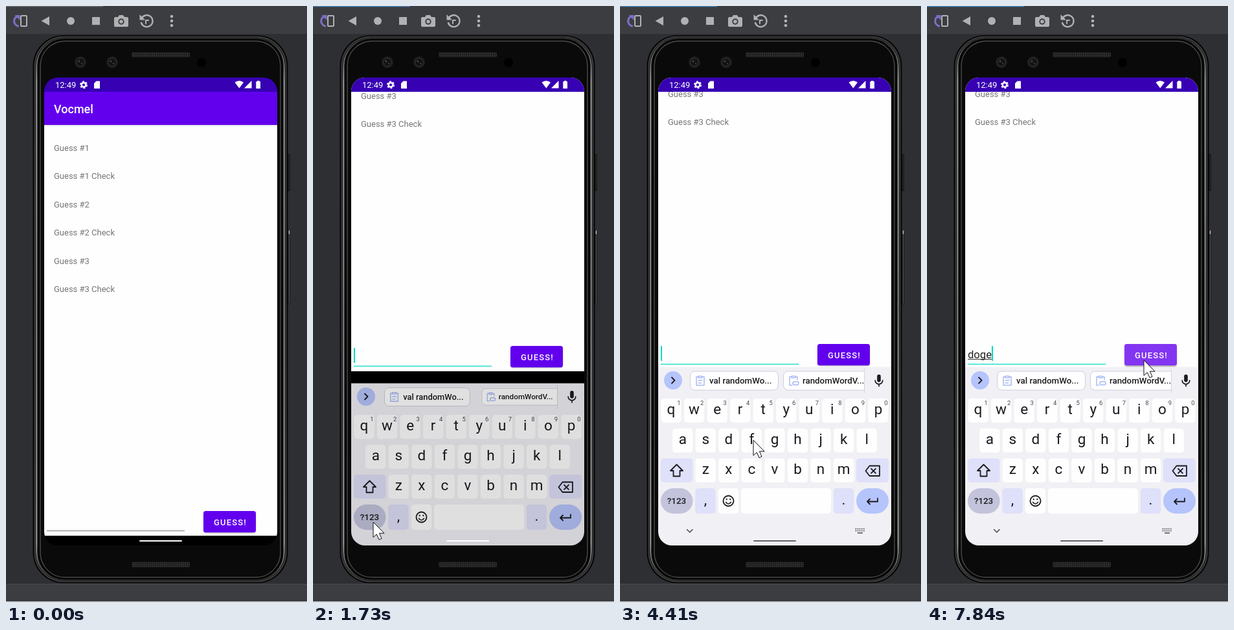
An HTML page for the animation above (8 s loop, 465x917 px).

```html
<!DOCTYPE html>
<html lang="en">
<head>
<meta charset="utf-8">
<title>Word game on a phone</title>
<style>
  html, body { margin: 0; width: 465px; height: 917px; overflow: hidden; background: #2e2f33; }
  svg { display: block; font-family: Roboto, sans-serif; }
  .label { font-size: 13px; fill: #757575; }
  .key { font-size: 22.5px; fill: #1b1b1f; text-anchor: middle; }
  .hint { font-size: 9.5px; fill: #44464f; text-anchor: middle; }
  .chip { font-size: 13.3px; font-weight: 500; fill: #1b1b1f; }
  .line { fill: none; stroke-linecap: round; stroke-linejoin: round; }
</style>
</head>
<body>
<svg width="465" height="917" viewBox="0 0 465 917">
  <defs>
    <clipPath id="screen"><rect x="59" y="110" width="360" height="720" rx="21"/></clipPath>
    <clipPath id="btnClip"><rect x="305" y="777" width="81" height="33" rx="3.5"/></clipPath>
    <clipPath id="chipClip"><rect x="95" y="556" width="282.5" height="42"/></clipPath>
    <pattern id="mesh" width="3" height="3" patternUnits="userSpaceOnUse">
      <rect width="3" height="3" fill="#161616"/><circle cx="1.5" cy="1.5" r="1" fill="#434343"/>
    </pattern>
    <linearGradient id="fade" x2="0" y2="1">
      <stop offset="0" stop-opacity=".12"/><stop offset="1" stop-opacity="0"/>
    </linearGradient>
    <linearGradient id="rim" x2="0" y2="1">
      <stop offset="0" stop-color="#2c2c2c"/><stop offset=".08" stop-color="#a0a0a0"/>
      <stop offset=".5" stop-color="#8a8a8a"/><stop offset=".93" stop-color="#a0a0a0"/>
      <stop offset="1" stop-color="#2c2c2c"/>
    </linearGradient>
    <filter id="blur" x="-20%" y="-40%" width="140%" height="180%"><feGaussianBlur stdDeviation="1.2"/></filter>
  </defs>

  <!-- emulator window -->
  <rect width="465" height="917" fill="#2e2f33"/>
  <rect width="465" height="43" fill="#3c3d41"/>
  <rect y="890" width="465" height="27" fill="#3c3d41"/>
  <path d="M0 889.5H465" stroke="#4b4c50"/>
  <path d="M0 916.5H465" stroke="#c4c4c6"/>
  <rect id="tab" width="150" height="1.2"/>
  <g fill="#afb1b3">
    <path class="line" d="M18.5 31Q11 28 13 20.5Q14 17.5 16 17" stroke="#7b70c6" stroke-width="3"/>
    <path d="M13.5 14H21.5V22Z" fill="#7b70c6"/>
    <rect x="23" y="15" width="9" height="16" rx="1" fill="none" stroke="#afb1b3" stroke-width="2"/>
    <path d="M54.5 23L67 16V30Z"/>
    <circle cx="100" cy="23" r="6"/>
    <rect x="133" y="17" width="12" height="12"/>
    <path d="M169 17H173L175 14H181L183 17H187Q189 17 189 19V30Q189 32 187 32H169Q167 32 167 30V19Q167 17 169 17Z"/>
    <circle cx="178" cy="24" r="4.7" fill="#3c3d41"/><circle cx="178" cy="24" r="2.8"/>
    <path class="line" d="M209.5 19A9 9 0 1 1 209 26" stroke="#afb1b3" stroke-width="2.4"/>
    <path d="M206.5 13V21.5H215Z"/>
    <path class="line" d="M216 27V22H220" stroke="#afb1b3" stroke-width="2"/>
    <circle cx="256" cy="16" r="2.3"/><circle cx="256" cy="23" r="2.3"/><circle cx="256" cy="30" r="2.3"/>
  </g>

  <!-- phone body -->
  <rect x="435" y="228" width="4" height="57" rx="1.5" fill="#17181a"/>
  <rect x="435" y="345" width="4" height="114" rx="1.5" fill="#17181a"/>
  <path d="M437.5 346V458" stroke="#5c5c5c"/>
  <path d="M437.5 345.5V351" stroke="#c8c8c8" stroke-width="1.5"/>
  <path d="M437.5 230V283" stroke="#2b2c2e"/>
  <rect x="41.5" y="45" width="394" height="843" rx="47" fill="#050505"/>
  <rect x="44.5" y="47.5" width="388" height="838" rx="45" fill="none" stroke="#3d3d3d" stroke-width="2"/>
  <rect x="47.3" y="49.5" width="382.4" height="834" rx="43" fill="#060606" stroke="url(#rim)" stroke-width="2"/>
  <rect x="53" y="54" width="371" height="825" rx="38" fill="#0a0a0a" stroke="#4a4a4a" stroke-width="1.4"/>
  <rect x="194" y="71" width="90" height="8" rx="2" fill="url(#mesh)"/>
  <rect x="194" y="855.5" width="90" height="8" rx="2" fill="url(#mesh)"/>
  <g id="lenses"></g>
  <circle cx="302" cy="87" r="7" fill="#000"/>

  <g clip-path="url(#screen)">
    <rect x="59" y="110" width="360" height="720"/>
    <g id="app">
      <rect x="59" y="132" width="360" height="684" fill="#fefefe"/>
      <rect x="59" y="183" width="360" height="3" fill="url(#fade)"/>
      <rect x="59" y="132" width="360" height="51" fill="#6200ee"/>
      <text x="74" y="165" font-size="18" font-weight="500" fill="#fff">Vocmel</text>
      <g id="labels"></g>
      <path id="field"/>
      <path id="under" stroke="#333"/>
      <text id="typed" x="63" y="799" font-size="16.6" fill="#212121"></text>
      <rect id="caret" y="780" width="2" height="23" fill="#03dac5"/>
      <rect id="shadow" x="305.5" y="779" width="80" height="32" rx="4" opacity=".3" filter="url(#blur)"/>
      <rect x="305" y="777" width="81" height="33" rx="3.5" fill="#6200ee"/>
      <g clip-path="url(#btnClip)" fill="#fff">
        <rect id="tint" x="305" y="777" width="81" height="33"/>
        <circle id="ripple" cx="336" cy="802" fill-opacity=".12"/>
      </g>
      <text x="321" y="798.5" font-size="13" font-weight="500" letter-spacing="1.15" fill="#fff">GUESS!</text>
    </g>
    <rect x="59" y="815" width="360" height="15"/>

    <g id="kb">
      <rect x="59" y="555.5" width="360" height="275" fill="#f1f0f5"/>
      <circle cx="82" cy="576" r="14" fill="#b5c4fb"/>
      <path class="line" d="M80 571.5L84.5 576L80 580.5" stroke="#1b1b1f" stroke-width="1.8"/>
      <g clip-path="url(#chipClip)"><g id="chip1"></g><g id="chip2"></g></g>
      <path d="M377.5 558V595" stroke="#d3d3da"/>
      <rect x="397.2" y="567" width="5.6" height="11.5" rx="2.8" fill="#1b1b1f"/>
      <path class="line" d="M394.2 576A5.8 5.8 0 0 0 405.8 576M400 582V585" stroke="#1b1b1f" stroke-width="1.7"/>
      <g id="keys"></g>
      <g class="line" stroke="#1b1b1f" stroke-width="1.8">
        <path d="M87.5 705.5L97 715H92.5V723.5H82.5V715H78Z"/>
        <path d="M385.5 707.5H401V723H385.5L379.5 715.2ZM388 711.8L395 718.8M395 711.8L388 718.8"/>
        <circle cx="167.5" cy="761.5" r="8"/>
        <path d="M163.6 763.5Q167.5 768.5 171.4 763.5" stroke-width="1.7"/>
        <path d="M164.7 759V759.1M170.3 759V759.1" stroke-width="2.3"/>
        <path d="M398 757.5V762.5H382M386 758.5L382 762.5L386 766.5"/>
      </g>
      <g id="nav" stroke="#4a4a4e" fill="none">
        <path class="line" d="M103.5 805.5L107.8 809.8L112 805.5" stroke-width="1.5"/>
        <path d="M363.5 804.5H378M363.5 807.5H378" stroke-width="1.6" stroke-dasharray="1.8 1.3"/>
        <path d="M367 810.8H375" stroke-width="1.4"/>
      </g>
    </g>

    <rect x="59" y="110" width="360" height="22" fill="#3700b3"/>
    <g fill="#fff">
      <text x="76" y="126" font-size="13">12:49</text>
      <circle cx="120" cy="121.3" r="3.3" fill="none" stroke="#fff" stroke-width="2.4"/>
      <circle cx="120" cy="121.3" r="5" fill="none" stroke="#fff" stroke-width="2" stroke-dasharray="2.8 2.436"/>
      <path d="M139.5 115.5H145V127H136V119Z"/>
      <path d="M353.5 117.5Q360.3 112.5 367 117.5L360.3 126.5Z"/>
      <path d="M379.5 115V126.5H368Z"/>
      <path d="M388 115H391.5V116.2H393V127H386.3V116.2H388Z"/>
    </g>
    <rect id="handle" x="206" y="822" width="66" height="2" rx="1"/>
  </g>

  <path id="cursor" d="M0 0V23.5L5.3 18.8L9 27L13 25.2L9.4 17.2H17Z" fill="#fff" stroke="#111" stroke-linejoin="round"/>
</svg>
<script>
const LOOP = 8000, CYAN = '#03dac5';
const $ = id => document.getElementById(id);
const set = (id, attrs) => { for (const k in attrs) $(id).setAttribute(k, attrs[k]); };
const rect = (x, y, w, h, r, fill, extra = '') =>
  `<rect x="${x}" y="${y}" width="${w}" height="${h}" rx="${r}" fill="${fill}" ${extra}/>`;
const text = (cls, x, y, s) => `<text class="${cls}" x="${x}" y="${y}">${s}</text>`;

function buildStage() {
  $('lenses').innerHTML = [115, 164].map(x =>
    `<circle cx="${x}" cy="86.5" r="9" fill="#1e1e1e"/><circle cx="${x}" cy="86.5" r="6" fill="#111" stroke="#333"/>
     <circle cx="${x - 2}" cy="85" r="1.5" fill="#484848"/><circle cx="${x + 2}" cy="88.5" r="1.2" fill="#3c3c3c"/>`).join('');

  $('labels').innerHTML = Array.from({ length: 6 }, (_, i) =>
    text('label', 74, 223 + i * 43.4, `Guess #${(i >> 1) + 1}${i % 2 ? ' Check' : ''}`)).join('');

  const chip = (x, w, s, link) => rect(x, 562, w, 29, 7, '#fff', 'stroke="#cdcddc"') +
    `<g class="line" stroke="#a9b9f5" stroke-width="1.5"><path d="M${x + 12.5} 570.5H${x + 9.5}V583.5H${x + (link ? 13 : 21.5)}M${x + 18.5} 570.5H${x + 21.5}V${link ? 575 : 583.5}M${x + 12.5} 569.5H${x + 18.5}V572H${x + 12.5}Z"/>` +
    (link ? `<rect x="${x + 14.5}" y="578" width="9" height="5" rx="2.5"/>`
          : `<path d="M${x + 12.5} 576H${x + 18.5}M${x + 12.5} 580H${x + 17}"/>`) +
    '</g>' + text('chip', x + 29.5, 580.7, s);
  $('chip1').innerHTML = chip(108.5, 136, 'val randomWo...', false);
  $('chip2').innerHTML = chip(252.5, 140, 'randomWordV...', true);

  const row = (letters, x0, y, hints) => [...letters].map((c, i) => {
    const x = x0 + i * 35.55;
    return rect(x - 15.7, y, 31.4, 37, 5, '#fefefe') + text('key', x, y + 24, c) +
      (hints ? text('hint', x + 12, y + 10, (i + 1) % 10) : '');
  }).join('');
  const soft = '#dfe0f9';
  $('keys').innerHTML = row('qwertyuiop', 79, 604, true) + row('asdfghjkl', 96.8, 650) + row('zxcvbnm', 132.3, 696) +
    rect(63, 696, 49.5, 37, 5, soft) + rect(365, 696, 50, 37, 5, soft) +
    rect(63, 742, 49.5, 39, 19.5, '#c3c3dc') + rect(116.2, 742, 31.6, 39, 5, soft) +
    rect(151.8, 742, 31.4, 39, 5, '#fefefe') + rect(187, 742, 139, 39, 5, '#fefefe') +
    rect(329.8, 742, 31.4, 39, 5, soft) + rect(365, 742, 50, 39, 19.5, '#b5c4fb') +
    `<g font-size="13.5" font-weight="500" fill="#1b1b1f" text-anchor="middle"><text x="87.5" y="766">?123</text></g>` +
    text('key', 132, 767, ',') + text('key', 345.5, 767, '.');
}

// hard steps: [time, ...values]
const PAN = [[0, 0], [1530, 130], [1600, 226], [1660, 247], [1730, 254], [1800, 257]];
// keyboard offset, opacity, chip scales
const KEYBOARD = [[0, 280, 0, 0, 0], [1600, 155, .32, .69, .15], [1660, 70, .65, .88, .6],
  [1730, 25, .88, .97, .88], [1800, 6, 1, 1, 1], [1870, 0, 1, 1, 1]];
// line colour, weight, height
const FIELD = [[0, '#777', 1, 807.5], [1260, CYAN, 2, 808], [1530, CYAN, 1.3, 808.2]];
// navigation icon opacity, handle colour
const NAV = [[0, 0, '#fff'], [2010, .3, '#cfcfd2'], [2150, .5, '#cfcfd2'], [2360, .5, '#b2b2b5'],
  [2430, .5, '#a0a0a3'], [3410, .75, '#808083'], [3480, 1, '#636366']];
// letters typed, letters underlined
const TYPED = [[0, 0, 0], [5860, 1, 1], [6060, 2, 2], [6130, 3, 3], [6260, 4, 3], [6480, 4, 4]];
const BLINK = [1330, 1870, 2360, 2860, 3410, 3880, 4410, 4870, 5400, 6880, 7490];

const easeOut = p => 1 - (1 - p) ** 2;
const easeInOut = p => p * p * (3 - 2 * p);
// start, end, steps, easing, from, bend, to
const MOVES = [
  [510, 1260, 12, easeOut, [285, 868], [170, 776], [93, 794]],
  [2570, 3140, 9, easeOut, [93, 794], [159, 756], [206, 668]],
  [6880, 7290, 7, easeInOut, [206, 668], [270, 600], [335, 545]],
];

const at = (table, t) => table.filter(r => r[0] <= t).pop().slice(1);

function stepped(t, start, end, n) {
  if (t < start) return 0;
  return Math.min(n, Math.floor((t - start) * (n - 1) / (end - start) + .01) + 1) / n;
}

function cursorAt(t) {
  const move = MOVES.filter(m => m[0] <= t).pop();
  if (!move) return null;
  const [start, end, n, ease, a, b, c] = move;
  const u = ease(stepped(t, start, end, n)), v = 1 - u;
  return a.map((_, i) => v * v * a[i] + 2 * u * v * b[i] + u * u * c[i]);
}

function render(t) {
  set('tab', { fill: t < 1330 ? '#6f7073' : '#4a88c7' });

  const [pan] = at(PAN, t);
  set('app', { transform: `translate(0 ${-pan})` });
  const [color, weight, y] = at(FIELD, t);
  set('field', { d: `M63 ${y}H276`, stroke: color, 'stroke-width': weight });

  const [count, lined] = at(TYPED, t);
  const typed = $('typed');
  typed.textContent = 'doge'.slice(0, count);
  const widthOf = n => n ? typed.getSubStringLength(0, n) : 0;
  set('caret', { x: 63 + widthOf(count), opacity: BLINK.filter(b => b <= t).length % 2 });
  set('under', { d: `M63 800.5H${63 + widthOf(lined)}`, opacity: lined ? 1 : 0 });

  const press = stepped(t, 7490, 7840, 6);
  set('tint', { opacity: .1 * Math.min(1, press * 2) });
  set('ripple', { r: press && 12 + 48 * press });
  set('shadow', { y: 779 + 1.5 * press });

  const [drop, alpha, s1, s2] = at(KEYBOARD, t);
  set('kb', { transform: `translate(0 ${drop})`, opacity: alpha });
  const grow = (x, s) => ({ transform: `translate(${x} 576) scale(${s}) translate(${-x} -576)` });
  set('chip1', grow(176.5, s1));
  set('chip2', grow(322.5, s2));

  const [icons, handle] = at(NAV, t);
  set('nav', { opacity: icons });
  set('handle', { fill: handle });

  const pos = cursorAt(t);
  set('cursor', { opacity: pos ? 1 : 0, transform: `translate(${pos || [0, 0]})` });
}

buildStage();
const began = performance.now();
function tick() {
  render((performance.now() - began) % LOOP);
  requestAnimationFrame(tick);
}
tick();
</script>
</body>
</html>
```
